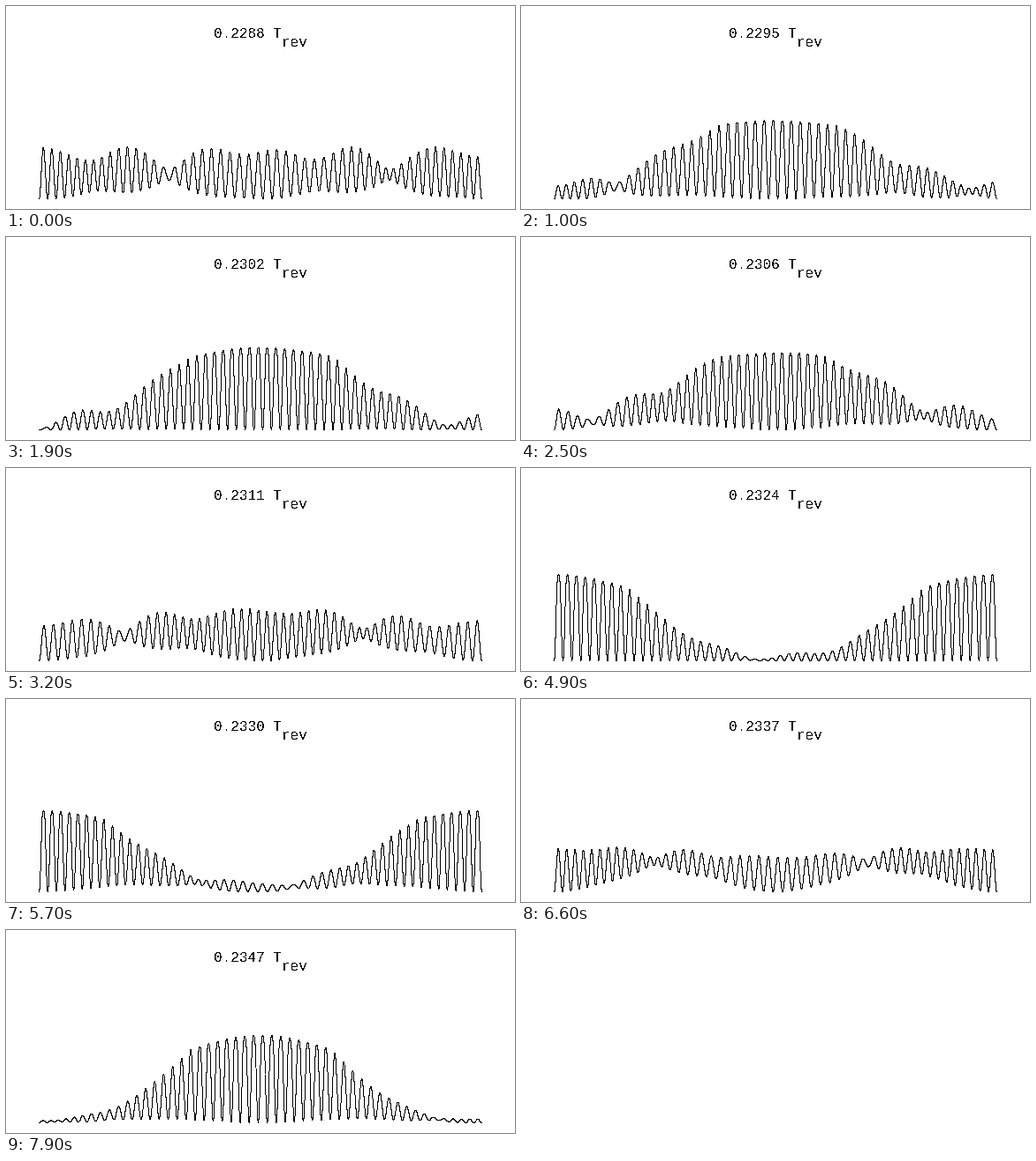
These frames come from a looping animation (576x230 px, 8000 ms). A matplotlib script:

```python
import numpy as np
import matplotlib as mpl
import matplotlib.pyplot as plt
from matplotlib.animation import FuncAnimation

W, H, DPI = 576, 230, 64
FRAMES, INTERVAL = 80, 100
PT = 72 / DPI                      # points per pixel

LEFT, RIGHT, BASE = 37.5, 538.5, 218.5
N0, SPREAD = 50, 2.3               # mean level and its deviation
T0, STEP = 0.228752, 7.49e-5       # in units of the revival time
UNIT = 28.5                        # height of the mean density
KNEE, SLOPE = 83, 0.33             # crests above the knee are flattened

mpl.rcParams["text.antialiased"] = False

# Wave packet in an infinite well, launched from the centre
levels = np.arange(N0 - 13, N0 + 14)
coef = np.exp(-((levels - N0) / (2 * SPREAD)) ** 2) * np.exp(-0.5j * np.pi * levels)
coef /= np.sqrt(np.sum(np.abs(coef) ** 2))
s = np.linspace(0, 1, 20001)
modes = np.sqrt(2) * np.sin(np.pi * np.outer(levels, s))
cols = (LEFT + (RIGHT - LEFT) * s).astype(int)


def density(t):
    c = coef * np.exp(-2j * np.pi * levels**2 * t)
    return (c.real @ modes) ** 2 + (c.imag @ modes) ** 2


def height(t):
    h = UNIT * density(t)
    return np.where(h > KNEE, KNEE + SLOPE * (h - KNEE), h)


def trace(t):
    """Hard-edged one-pixel curve on a white stage."""
    stage = np.ones((H, W))
    stage[(BASE - height(t)).astype(int), cols] = 0
    return stage


fig = plt.figure(figsize=(W / DPI, H / DPI), dpi=DPI, facecolor="white")
ax = fig.add_axes([0, 0, 1, 1])
ax.axis("off")
curve = ax.imshow(trace(T0), cmap="gray", vmin=0, vmax=1, aspect="auto",
                  interpolation="nearest", extent=(0, W, H, 0))


def label(x, y, text):
    return ax.text(x, y, text, family="Liberation Mono", size=16 * PT,
                   color="black", ha="left", va="baseline")


clock = label(235, 36, "")
label(312, 46, "rev")


def update(i):
    t = T0 + STEP * i
    curve.set_data(trace(t))
    clock.set_text(f"{t:.4f} T")
    return curve, clock


anim = FuncAnimation(fig, update, frames=FRAMES, interval=INTERVAL,
                     repeat=True, repeat_delay=0, blit=False)
plt.show()
```
